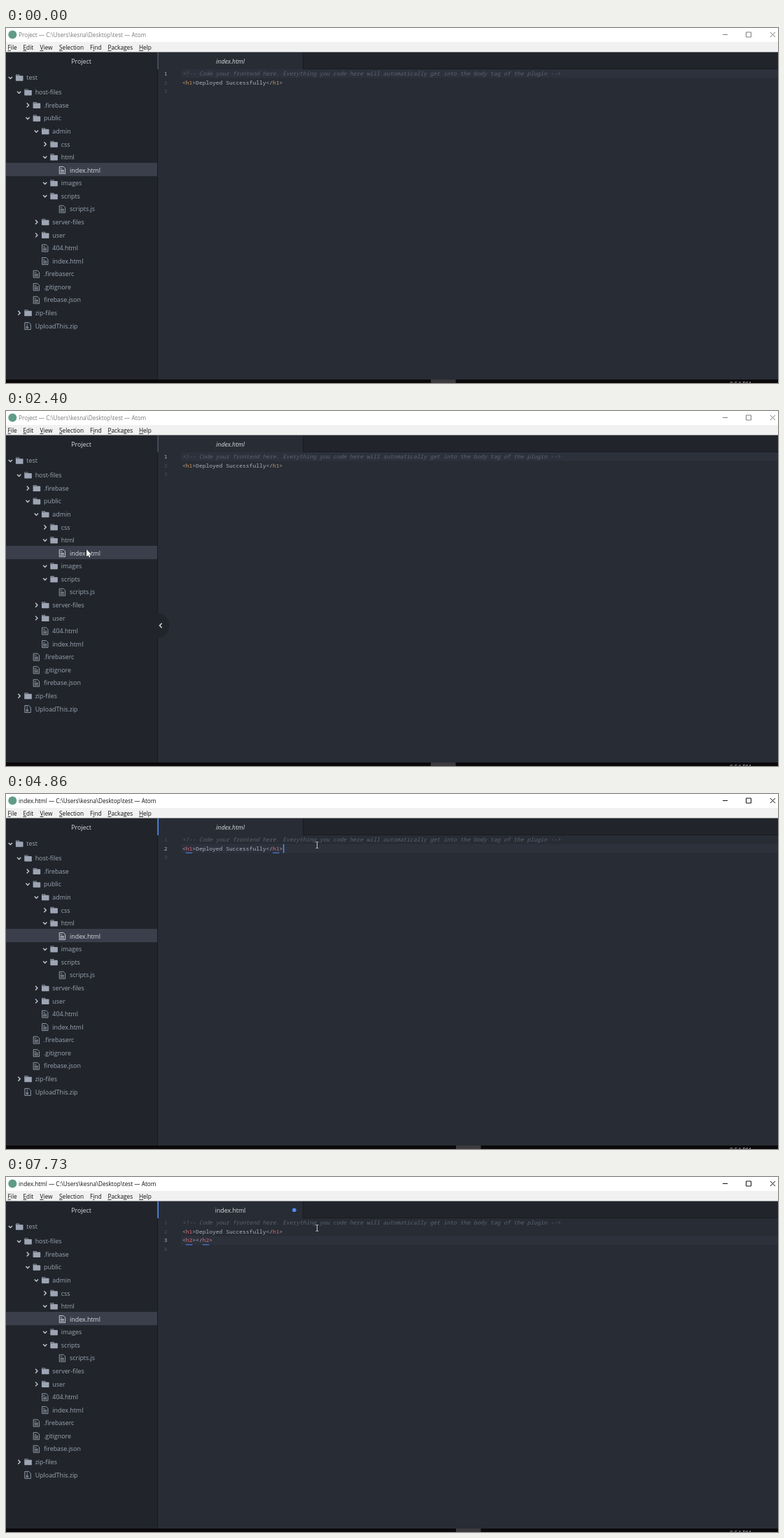
Write an HTML page with a canvas that moves like this. It is 1103 by 508 pixels and loops after 8 s.

```html
<!DOCTYPE html>
<html lang="en">
<head>
<meta charset="utf-8">
<title>Editor</title>
<style>
  html, body { margin: 0; width: 100%; height: 100%; overflow: hidden; background: #282c34; }
  canvas { display: block; }
</style>
</head>
<body>
<canvas id="stage" width="1103" height="508"></canvas>
<script>
const W = 1103, H = 508, LOOP = 8000;
const ctx = document.getElementById('stage').getContext('2d');
const UI = '"Open Sans", "Noto Sans", sans-serif';
const MONO = '"Noto Sans Mono", "DejaVu Sans Mono", monospace';
const CODE_FONT = `7.97px ${MONO}`;
const CHAR = 4.78, CODE_X = 252, LINE = 12.7;
const C = {
  side: '#21252b', edit: '#282c34', border: '#181a1f', text: '#9da5b4', bright: '#d7dae0',
  select: '#3a3f4b', line: '#2c313c', popup: '#252930', code: '#abb2bf', comment: '#5c6370',
  gutter: '#495162', blue: '#568af2', caret: '#528bff', red: '#e06c75', orange: '#d19a66', green: '#98c379'
};

// [depth, kind, label]; kinds: o open folder, c closed folder, f file, z archive
const TREE = [
  [0, 'o', 'test'], [1, 'o', 'host-files'], [2, 'c', '.firebase'], [2, 'o', 'public'],
  [3, 'o', 'admin'], [4, 'c', 'css'], [4, 'o', 'html'], [5, 'f', 'index.html'],
  [4, 'o', 'images'], [4, 'o', 'scripts'], [5, 'f', 'scripts.js'], [3, 'c', 'server-files'],
  [3, 'c', 'user'], [3, 'f', '404.html'], [3, 'f', 'index.html'], [2, 'f', '.firebaserc'],
  [2, 'f', '.gitignore'], [2, 'f', 'firebase.json'], [1, 'c', 'zip-files'], [1, 'z', 'UploadThis.zip']
];
const SELECTED = 7;
const MENU = [['File', 2.5, 0], ['Edit', 24.5, 0], ['View', 48.5, 0], ['Selection', 76, 0],
  ['Find', 120, 1], ['Packages', 145.5, 0], ['Help', 190, 0]];
const HINTS = [['h1', 'Heading 1'], ['h2', 'Heading 2'], ['h3', 'Heading 3'], ['h4', 'Heading 4'],
  ['h5', 'Heading 5'], ['h6', 'Heading 6'], ['hack', 'hack'], ['head', 'Head'],
  ['header', 'Header'], ['hgroup', 'Heading Group']];
const COMMENT = '<!-- Code your frontend here. Everything you code here will automatically get into the body tag of the plugin -->';

// Pointer path: [step, x, y]
const STEP = 77.4, STEP_START = 134;
const PATH = [[0, 988, 498], [2, 800, 430], [4, 520, 330], [6, 300, 250], [8, 170, 185],
  [10, 104, 156], [14, 8, 86], [18, 40, 150], [21, 69.5, 186.5], [26, 115, 198], [32, 115, 198],
  [34, 119, 196], [37, 119, 196], [40, 99, 200], [43, 118, 198], [44, 120, 196], [45, 170, 180],
  [46, 310, 150], [47, 439, 115], [50, 444, 79], [55, 444, 79], [57, 449, 76], [58, 444.5, 73]];
const CARET_ON = [[4180, 4480], [4860, 5240], [5320, 5710], [6020, 6650], [7030, 7730]];
const T = { focus: 4180, tags: 4330, enter: 5320, dirty: 5640, typeH: 6250, popup: 6330, type2: 6420, expand: 7430 };

const rect = (x, y, w, h, color) => { ctx.fillStyle = color; ctx.fillRect(x, y, w, h); };
function text(str, x, y, font, color, align = 'left') {
  ctx.font = font;
  ctx.fillStyle = color;
  ctx.textAlign = align;
  ctx.fillText(str, x, y);
}
function trace(points, close) {
  ctx.beginPath();
  points.forEach(([x, y]) => ctx.lineTo(x, y));
  if (close) ctx.closePath();
}
function stroke(points, color, width = 1, close = false) {
  trace(points, close);
  ctx.strokeStyle = color;
  ctx.lineWidth = width;
  ctx.stroke();
}
function disc(x, y, r, color) {
  ctx.beginPath();
  ctx.arc(x, y, r, 0, Math.PI * 2);
  ctx.fillStyle = color;
  ctx.fill();
}
// Value of a piecewise linear track, column i
function along(keys, k, i) {
  const n = keys.findIndex(key => key[0] > k);
  if (n < 0) return keys[keys.length - 1][i];
  if (n === 0) return keys[0][i];
  const a = keys[n - 1], b = keys[n];
  return a[i] + (b[i] - a[i]) * (k - a[0]) / (b[0] - a[0]);
}

function windowBars(focused) {
  rect(0, 0, W, 20, '#ffffff');
  rect(0, 20, W, 15, C.side);
  rect(0, 20, W, 14.5, '#f1f1f1');
  disc(9.3, 9.5, 6, '#5f9c86');
  const ink = focused ? '#111111' : '#7c7c7c';
  const name = focused ? 'index.html' : 'Project';
  text(`${name} — C:\\Users\\kesna\\Desktop\\test — Atom`, 18, 12.7, `8.24px ${UI}`, ink);
  rect(1024, 9, 7, 1, ink);
  stroke([[1057.5, 6], [1064.5, 6], [1064.5, 13], [1057.5, 13]], ink, 1, true);
  stroke([[1092, 6], [1099, 13]], ink);
  stroke([[1099, 6], [1092, 13]], ink);
  for (const [label, x, key] of MENU) {
    text(label, x, 31, `8.3px ${UI}`, '#111111');
    const before = ctx.measureText(label.slice(0, key)).width;
    rect(x + before, 32, ctx.measureText(label[key]).width, 0.8, '#111111');
  }
}

function chevron(x, y, open, color) {
  stroke(open ? [[x - 2.6, y - 1.3], [x, y + 1.4], [x + 2.6, y - 1.3]]
              : [[x - 1.3, y - 3], [x + 1.6, y], [x - 1.3, y + 3]], color, 1.4);
}
function folder(x, y, color) {
  ctx.fillStyle = color;
  ctx.beginPath();
  ctx.roundRect(x - 5.3, y - 4.6, 5.3, 3, 0.7);
  ctx.roundRect(x - 5.3, y - 3, 10.6, 7.5, 0.7);
  ctx.fill();
  rect(x - 4.5, y - 3.8, 3.7, 0.7, C.side);
}
function file(x, y, color, zipped) {
  stroke([[x - 4.2, y - 5], [x + 1.6, y - 5], [x + 4.2, y - 2.4], [x + 4.2, y + 5], [x - 4.2, y + 5]], color, 0.9, true);
  if (zipped) {
    for (let i = 0; i < 5; i++) rect(x - 1.5 + (i % 2) * 0.8, y - 4 + i * 0.9, 0.8, 0.9, color);
    ctx.strokeRect(x - 1.9, y + 1.2, 2.3, 1.8);
    return;
  }
  rect(x - 2.9, y - 2.7, 3, 0.8, color);
  for (let i = 0; i < 3; i++) rect(x - 2.9, y - 0.5 + i * 1.55, 5.5, 0.8, color);
}

function sidebar() {
  rect(0, 35, 216, 468, C.side);
  text('Project', 107.5, 50.6, `8.9px ${UI}`, C.bright, 'center');
  TREE.forEach(([depth, kind, label], i) => {
    const y = i ? 92 + (i - 1) * 18.58 : 71.2;
    const dx = depth * 12.35;
    const picked = i === SELECTED;
    const color = picked ? C.bright : C.text;
    if (picked) rect(0, 193, 216, 19, C.select);
    if (kind === 'o' || kind === 'c') {
      chevron(6.3 + dx, y, kind === 'o', '#c3c9d4');
      folder(19.2 + dx, y, color);
    } else {
      file(18.7 + dx, y, color, kind === 'z');
    }
    text(label, 29.3 + dx, y + 3.2, `8.9px ${UI}`, color);
  });
}

function tabs(focused, dirty) {
  rect(216, 35, W - 216, 24, C.side);
  rect(424, 58, W - 424, 1, C.border);
  rect(217, 35, 207, 24, C.edit);
  rect(424, 35, 1, 24, C.border);
  rect(216.4, 35, 1.6, 24, focused ? C.blue : '#4b5160');
  text('index.html', 320.5, 50.6, `${dirty ? '' : 'italic '}8.8px ${UI}`, C.bright, 'center');
  if (dirty) disc(411.8, 47.3, 2.8, C.blue);
}

// Draws coloured runs of code: [string, color, ...]
function code(row, ...runs) {
  let x = CODE_X;
  for (let i = 0; i < runs.length; i += 2) {
    text(runs[i], x, baseline(row), CODE_FONT, runs[i + 1]);
    x += runs[i].length * CHAR;
  }
}
const baseline = row => 67.9 + (row - 1) * LINE;
const tagged = (row, tag, body, color) =>
  code(row, '<', C.code, tag, color, `>${body}</`, C.code, tag, color, '>', C.code);
function underline(row, ...columns) {
  for (const col of columns) rect(CODE_X + col * CHAR, baseline(row) + 3.1, 2 * CHAR, 1, C.caret);
}

function editor(t) {
  const row = t < T.focus ? 1 : t < T.enter ? 2 : 3;
  const rows = t < T.enter ? 3 : 4;
  rect(216, 59, W - 216, 444, C.edit);
  rect(250, 59 + (row - 1) * LINE, W - 250, LINE, C.line);
  rect(216, 59, 1, 444, C.border);
  for (let i = 1; i <= rows; i++) {
    text(String(i), 225.8, baseline(i), CODE_FONT, i === row ? C.code : C.gutter);
  }
  text(COMMENT, CODE_X, baseline(1), `italic ${CODE_FONT}`, C.comment);
  tagged(2, 'h1', 'Deployed Successfully', t < T.focus ? C.orange : C.red);
  if (t >= T.tags && t < T.enter) underline(2, 1, 27);

  let col = row === 2 ? 30 : 0;
  if (t >= T.expand) {
    tagged(3, 'h2', '', C.red);
    underline(3, 1, 6);
    col = 4;
  } else if (t >= T.typeH) {
    const typed = t < T.type2 ? 'h' : 'h2';
    code(3, typed, C.code);
    col = typed.length;
  }
  if (CARET_ON.some(([a, b]) => t >= a && t < b)) {
    rect(CODE_X + col * CHAR + 0.5, 59 + (row - 1) * LINE, 1.5, LINE, C.caret);
  }
  if (t >= T.popup && t < T.expand) {
    t < T.type2 ? popup(HINTS, 1) : popup([HINTS[1]], 2);
  }
}

function popup(hints, matched) {
  const x = 228.5, y = 97, pitch = 17.4, h = hints.length * pitch - 0.5;
  ctx.save();
  ctx.shadowColor = 'rgba(0,0,0,.5)';
  ctx.shadowBlur = 4;
  ctx.shadowOffsetY = 1;
  rect(x, y, 175, h, C.popup);
  ctx.restore();
  rect(x, y, 16.5, h, '#3c483f');
  rect(x, y, 16.5, pitch - 0.5, '#4b584c');
  rect(245, y, 152, pitch - 0.5, C.select);
  hints.forEach(([word, note], i) => {
    const mid = y + 8.2 + i * pitch;
    rect(232.5, mid - 0.8, 4, 1.6, C.green);
    trace([[235.5, mid - 3], [239, mid], [235.5, mid + 3]], true);
    ctx.fill();
    rect(240, mid - 3, 1.3, 6, C.green);
    text(word.slice(0, matched), CODE_X, mid + 2.9, `bold ${CODE_FONT}`, '#ffffff');
    text(word.slice(matched), CODE_X + matched * CHAR, mid + 2.9, CODE_FONT, C.bright);
    text(note, 300, mid + 2.5, `7.13px ${MONO}`, i ? '#7f8591' : '#a3a9b5');
  });
  if (hints.length > 1) {
    ctx.beginPath();
    ctx.roundRect(399.5, 98, 2.6, 154, 1.3);
    ctx.fillStyle = '#4b5160';
    ctx.fill();
  }
}

function dockHandle(k) {
  const shown = along([[7, 0], [10, 1], [44, 1], [45, 0.95], [47, 0.74], [49, 0]], k, 1);
  if (shown <= 0) return;
  const slide = 18 * (1 - shown);
  ctx.save();
  ctx.beginPath();
  ctx.rect(216, 280, 40, 60);
  ctx.clip();
  disc(215.3 - slide, 307, 18, C.side);
  ctx.globalAlpha = along([[9, 0.4], [12, 1], [44, 1], [47, 0.22], [49, 0]], k, 1);
  const x = 221 - slide * 0.85;
  stroke([[x + 1.7, 303.8], [x - 1.5, 307], [x + 1.7, 310.2]], C.bright, 1.5);
  ctx.restore();
}

// Fades as one layer over the sidebar
function tooltip(x, y, alpha) {
  if (alpha <= 0) return;
  const gray = v => `rgb(${[33, 37, 43].map(base => base + (v - base) * alpha).join(' ')})`;
  rect(x, y, 47, 14.5, gray(118));
  rect(x + 0.7, y + 0.7, 45.6, 13.1, gray(255));
  text('index.html', x + 3.5, y + 10.3, `8.1px ${UI}`, gray(87));
}

function pointer(k) {
  if (k < 0) return;
  const x = along(PATH, k, 1), y = along(PATH, k, 2);
  if (x > 218 && y < 503) {
    const beam = '#c4c7cc';
    rect(x - 0.5, y - 4.5, 1, 9, beam);
    rect(x - 2.2, y - 4.6, 4.4, 0.7, beam);
    rect(x - 2.2, y + 3.9, 4.4, 0.7, beam);
    return;
  }
  const shape = [[0, 0], [0, 10.4], [2.4, 8.2], [4, 11.8], [5.6, 11.1], [4.1, 7.6], [7.4, 7.4]];
  stroke(shape.map(([a, b]) => [x + a, y + b]), '#000000', 1, true);
  ctx.fillStyle = '#ffffff';
  ctx.fill();
}

function taskbar(focused) {
  rect(0, 503, W, 5, '#0c090b');
  rect(focused ? 643 : 607, 503, 35.5, 5, '#3d3b3d');
  text('9:54 PM', 1034, 513, `8.2px ${UI}`, '#b0b0b0');
}

function draw(t) {
  const k = Math.floor((t - STEP_START) / STEP);
  const focused = t >= T.focus;
  windowBars(focused);
  sidebar();
  editor(t);
  tabs(focused, t >= T.dirty);
  dockHandle(k);
  taskbar(focused);
  tooltip(115, 219.3, along([[30, 0], [32, 1], [39, 1], [41, 0]], k, 1));
  tooltip(119.7, 215.5, along([[43, 0], [44, 0.9], [45, 1], [47, 0.33], [49, 0]], k, 1));
  pointer(k);
}

function frame(now) {
  draw(now % LOOP);
  requestAnimationFrame(frame);
}
requestAnimationFrame(frame);
</script>
</body>
</html>
```
